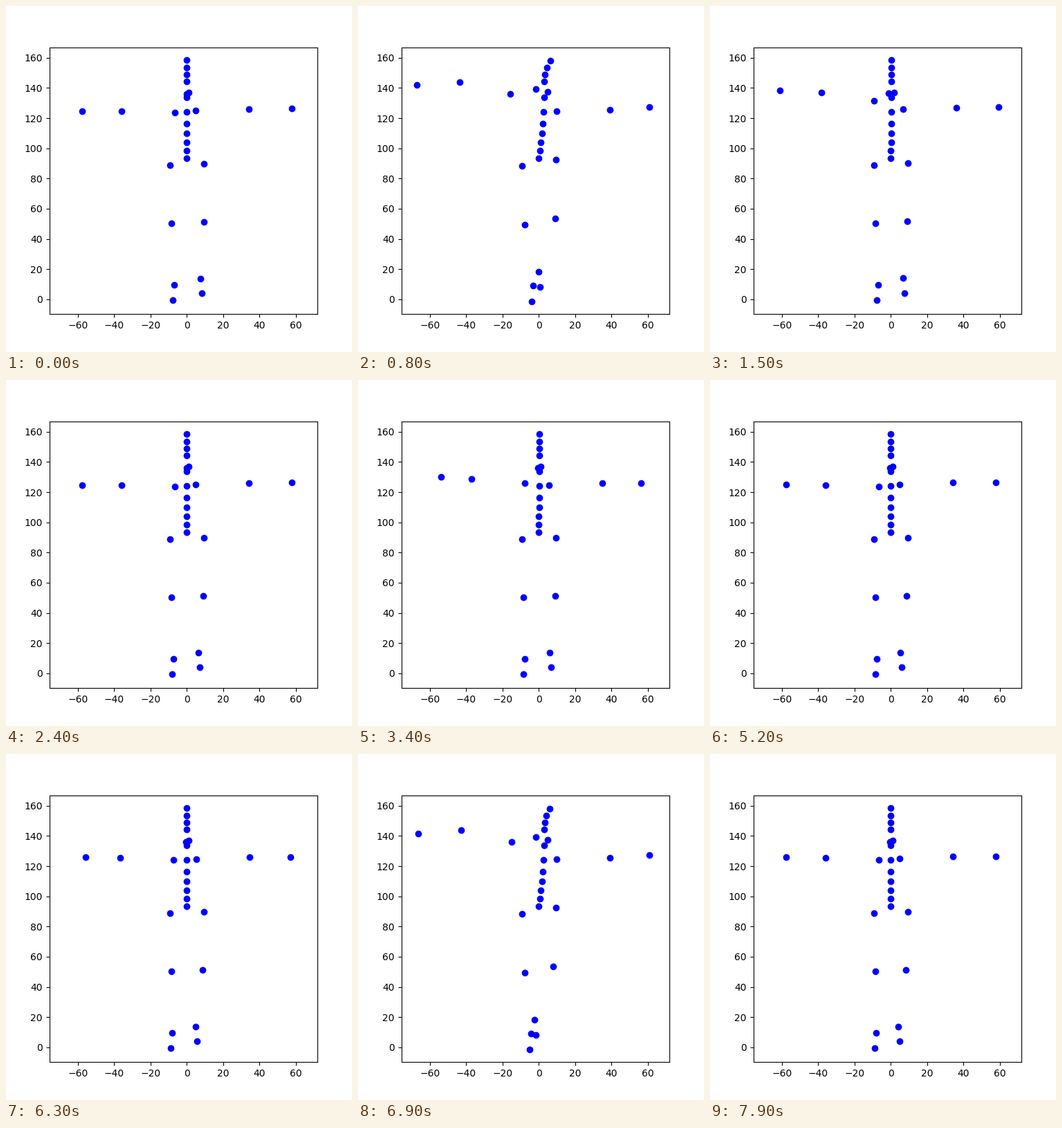
Write a matplotlib script that moves like this. It is 500 px wide and 500 px high and loops after 8 s.

```python
import numpy as np
import matplotlib.pyplot as plt
from matplotlib.animation import FuncAnimation

FRAMES, STEP = 80, 100
XLIM, YLIM = (-75.81, 71.813), (-9.71, 166.79)

# Each sway starts to rise, then starts to fall (ms).
SWAYS = [(0, 1010), (3200, 4070), (6200, 6850)]
RISE, FALL = 680, 1200

SPINE = [93.5, 98.5, 104, 110, 116.3, 124.1, 133.9, 144.3, 149, 153.6, 158.5]
NECK, CHIN, TOP = SPINE[6], SPINE[7], SPINE[-1]


def ease(t, begin, length):
    u = np.clip((t - begin) / length, 0, 1)
    return u * u * (3 - 2 * u)


def bump(t, begin, end):
    u = np.clip((t - begin) / (end - begin), 0, 1)
    return np.sin(np.pi * u) ** 2


def pose(t):
    """All joints at time t, in stage pixels with y downwards."""
    raised = sum(ease(t, a, RISE) - ease(t, b, FALL) for a, b in SWAYS)
    windup = sum(bump(t, a, a + 400) for a, _ in SWAYS)
    reach = 3 * sum(bump(t, a + 300, b) for a, b in SWAYS)
    follow = 8 * sum(bump(t, b, b + 550) for _, b in SWAYS)
    drift = t / 7900

    # The arm stays up longest; trunk, then leg, drop back sooner.
    lean, lift, kick = raised ** 2.5, raised ** 4, raised ** 8
    lag = raised - lean
    joints = []

    def limb(x, y, *bones):
        joints.append((x, y))
        for dx, dy in bones:
            x, y = x + dx, y + dy
            joints.append((x, y))

    for h in SPINE:
        up = min((h - SPINE[0]) / (NECK - SPINE[0]), 1)
        nod = 9 * kick * max((h - CHIN) / (TOP - CHIN), 0) ** 2
        bend = (8 * lift + windup - 0.3) * np.sin(np.pi / 2 * up)
        limb(261.2 + bend + nod, 423.8 - 2.181 * h + 0.08 * nod)

    # Collar
    limb(260.5 - 4 * raised, 127 - 7 * lift)
    limb(264.3 + 9.5 * lift, 125 - kick)

    # Arms: shoulder, elbow, hand
    limb(244 - 22 * lean - 3 * windup - reach, 154.2 - 27 * raised,
         (-77 + 4 * lean, -2.2 - 15.5 * raised),
         (-57 - 5 * raised + 14 * windup, 5 * lean - 16 * lag))
    limb(274 + 13 * lean + 2 * windup + follow,
         150.9 - 6 * lag + 1.4 * lean + 2 * windup,
         (76.8, -2.4),
         (62 - 5 * lift - 6 * windup, -0.5 - 3 * lift))

    # Legs: hip, knee, then ankle and toe
    limb(236.8, 230 + lift)
    limb(238.6 + 2.5 * lift, 314.2 + 1.8 * lift)
    limb(243 - 3.5 * drift + 10 * kick, 403.2 + kick,
         (-2, 21.4 + kick))
    limb(286, 227.6 - 6 * lift)
    limb(286 - 3 * drift - raised, 312.1 - 5 * lift)
    limb(281 - 9 * drift - 19 * kick, 393.6 - 9.5 * kick,
         (2, 21.4 + 0.5 * kick))
    return np.array(joints).T


def to_axes(x, y):
    """Stage pixels to axis units."""
    return (np.interp(x, (62.5, 450), XLIM),
            np.interp(y, (60, 445), YLIM[::-1]))


fig, ax = plt.subplots(figsize=(5, 5), dpi=100)
ax.set_xlim(*XLIM)
ax.set_ylim(*YLIM)
dots, = ax.plot(*to_axes(*pose(0)), "bo")


def update(i):
    dots.set_data(*to_axes(*pose(i * STEP)))
    return dots,


anim = FuncAnimation(fig, update, frames=FRAMES, interval=STEP,
                     repeat=True, repeat_delay=0)
plt.show()
```
